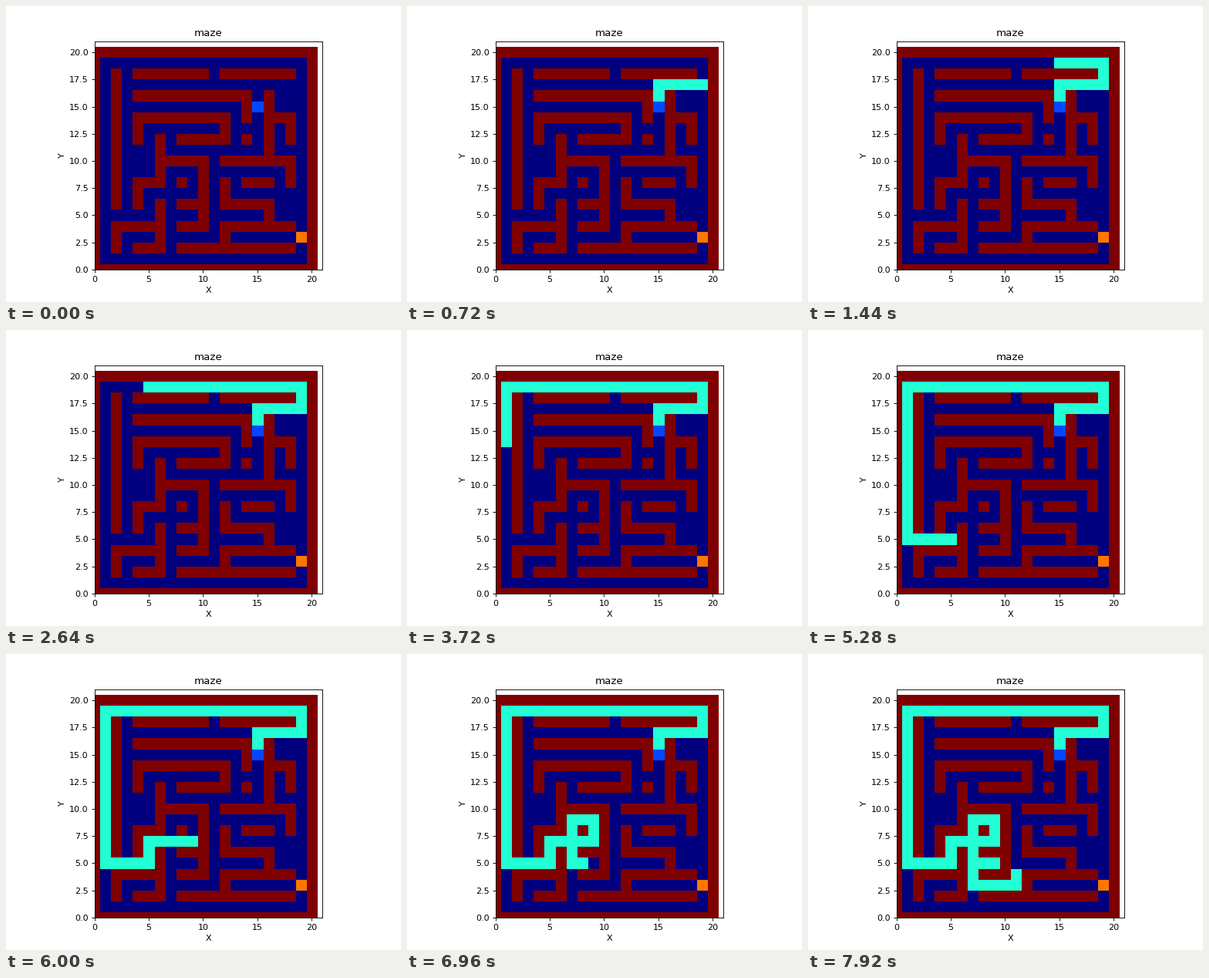
These frames come from a looping animation (512x384 px, 8000 ms). A matplotlib script:

```python
import numpy as np
import matplotlib.pyplot as plt
from matplotlib.animation import FuncAnimation

# Top row first; '#' wall, 'S' start, 'E' exit
MAZE = """
#####################
#...................#
#.#.#######.#######.#
#.#.................#
#.#.###########.#...#
#.#...........#S#...#
#.#.#########.#.###.#
#.#.#.......#...#.#.#
#.#.#.#.#####.#.#.#.#
#.#...#.........#...#
#.#...#####.#######.#
#.#...#...#.......#.#
#.#.###.#.#.#.###.#.#
#.#.#.....#.#.......#
#.#.#.#.###.#####...#
#.....#...#.....#...#
#.#####.###.#######.#
#.#...#.....#......E#
#.#.###.###########.#
#...................#
#####################
""".split()[::-1]

FLOOR, START, TRAIL, EXIT, WALL = 0, 50, 100, 200, 255
LEVELS = {'#': WALL, '.': FLOOR, 'S': START, 'E': EXIT}
MOVES = [(1, 0), (0, 1), (-1, 0), (0, -1)]  # right, up, left, down

INTERVAL = 40
FRAMES = 200
FRAMES_PER_STEP = 3

grid = np.array([[LEVELS[c] for c in row] for row in MAZE])


def explore(start):
    """Cells in the order a depth-first walk first enters them."""
    seen, stack, order = set(), [start], []
    while stack:
        cell = stack.pop()
        if cell in seen:
            continue
        seen.add(cell)
        order.append(cell)
        x, y = cell
        for dx, dy in reversed(MOVES):
            nxt = (x + dx, y + dy)
            if grid[nxt[1], nxt[0]] != WALL and nxt not in seen:
                stack.append(nxt)
    return order


start_y, start_x = np.argwhere(grid == START)[0]
visits = explore((int(start_x), int(start_y)))[1:]

fig, ax = plt.subplots(figsize=(6.4, 4.8), dpi=80)
image = ax.imshow(grid, cmap='jet', vmin=0, vmax=255, origin='lower',
                  interpolation='nearest')
ax.set_xlim(0, 21)
ax.set_ylim(0, 21)
ax.set_title('maze')
ax.set_xlabel('X')
ax.set_ylabel('Y')


def update(frame):
    cells = grid.copy()
    for x, y in visits[:frame // FRAMES_PER_STEP]:
        cells[y, x] = TRAIL
    image.set_data(cells)
    return [image]


anim = FuncAnimation(fig, update, frames=FRAMES, interval=INTERVAL,
                     repeat=True, repeat_delay=0)
plt.show()
```
